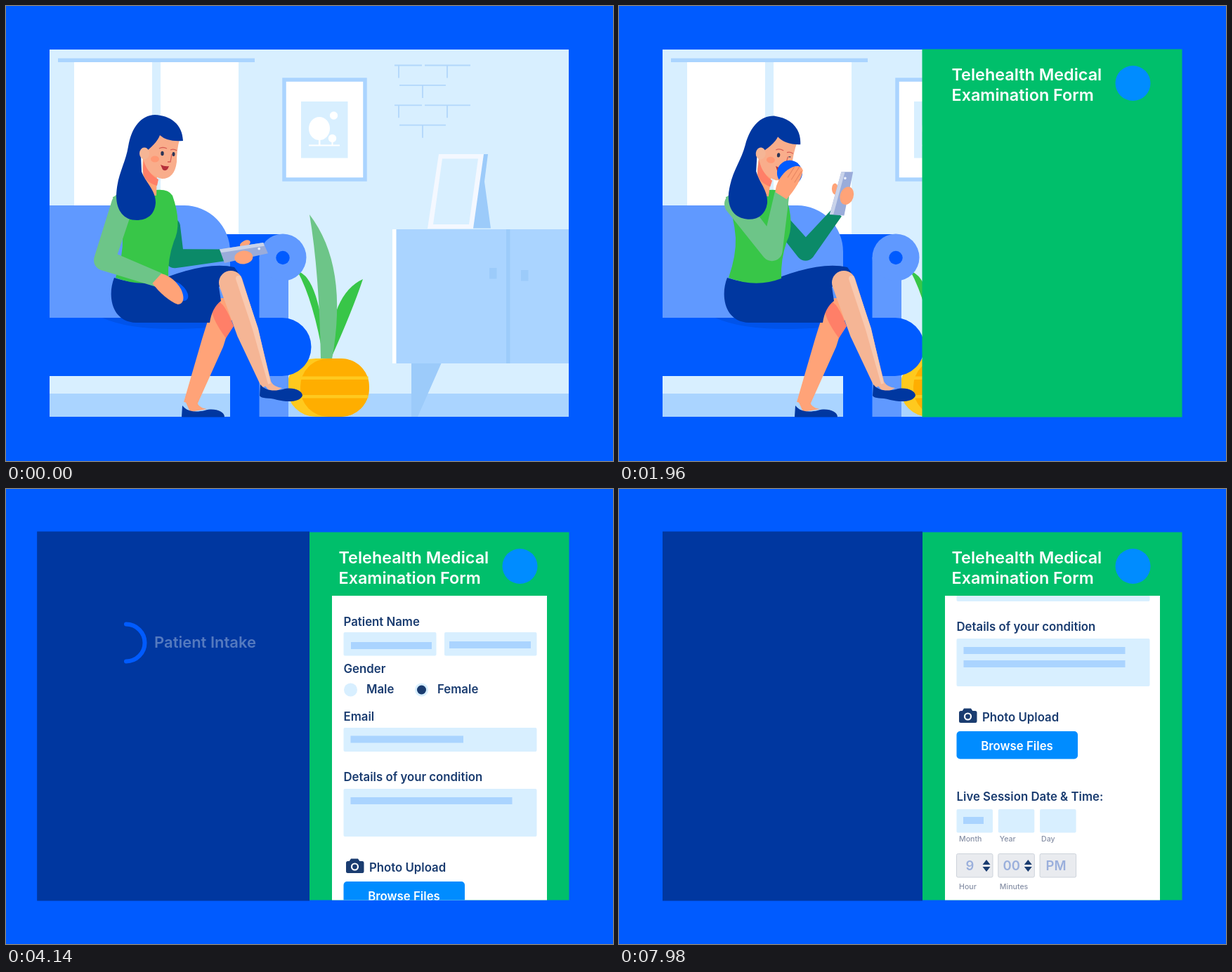
Write an HTML page that moves like this. It is 864 px wide and 648 px high and loops after 8000 ms.

```html
<!DOCTYPE html>
<html lang="en">
<head>
<meta charset="utf-8">
<title>Telehealth form</title>
<style>
html, body { margin: 0; width: 100%; height: 100%; overflow: hidden; background: #005bff; }
svg { display: block; width: 100%; height: 100%; }
text { font-family: Inter, "Open Sans", sans-serif; font-weight: 600; }
.sky { fill: #d8efff } .pale { fill: #aad4ff } .shade { fill: #9ccbfa } .white { fill: #fff }
.blue { fill: #005bff } .soft { fill: #6099ff } .navy { fill: #0037a0 }
.green { fill: #38c648 } .mint { fill: #6dc588 } .teal { fill: #0b8a68 }
.skin { fill: #ffa378 } .peach { fill: #f5b595 } .coral { fill: #ff7f68 }
.ink { fill: #1a3c70; font-size: 16.8px }
.small { font-size: 10.6px; font-weight: 500; fill: #8790a6 }
.value { font-size: 18.5px; fill: #9aafdc }
.line { fill: none; stroke: #005bff; stroke-width: 6; stroke-linecap: round; stroke-linejoin: round }
</style>
</head>
<body>
<svg viewBox="0 0 864 648">
<defs>
  <clipPath id="roomClip"><path d="M62 61H802V585.5H62z"/></clipPath>
  <clipPath id="cardClip"><path d="M464 152H770V585.5H464z"/></clipPath>
  <path id="shoe" d="M1 0C8 9 20 10 33 7 46 3 61 8 61 16 57 26 38 25 25 22 12 18 3 21 0 16z"/>
</defs>

<g clip-path="url(#roomClip)">
  <path class="sky" d="M62 62H801V585H62z"/>
  <path class="pale" d="M62 552H801V585H62zM74 74.5H354V80H74z"/>
  <path class="white" d="M97 80H208V325H97zM220 80H331V325H220z"/>

  <rect class="white" x="396" y="105" width="115" height="142" stroke="#aad4ff" stroke-width="5.5"/>
  <path class="sky" d="M420 136H486.500V216.500H420z"/>
  <g class="white">
    <ellipse cx="446" cy="174.500" rx="15" ry="16.500"/><circle cx="466.500" cy="156" r="5.700"/><circle cx="464.500" cy="188.500" r="5.700"/>
    <path d="M431 197.500H475V199.500H431zM445 188h2.500v10h-2.500zM463.500 192h2v6h-2z"/>
  </g>
  <path id="bricks" fill="none" stroke="#b2d7fb" stroke-width="1.800"/>

  <path class="shade" d="M679 211H686L681 250 690 316.500H664z"/>
  <path fill="#f4f8ff" d="M616 211H680L665 317H600z"/>
  <path class="sky" d="M621 217.500H672L659 311H608z"/>
  <path class="white" d="M550 318H556V509H550z"/>
  <path class="pale" d="M555.500 318H801V509H555.500z"/>
  <path class="shade" d="M712 318h5.500v191h-5.500zM688 373h10.500v15.500h-10.500zM733 376h10.500v15.500h-10.500zM577 509H619.500L586 585H577z"/>

  <path class="green" d="M452 503Q438 420 415 378 446 385 456 503zM459 503Q462 410 508 389 493 434 462 503z"/>
  <path class="mint" d="M448 503Q446 380 432 297 488 370 464 503z"/>
  <rect x="400" y="502" width="117" height="83" rx="41" fill="#ffc91e"/>
  <rect x="419" y="502" width="98" height="83" rx="40" fill="#ffae00"/>
  <path fill="#ffc91e" d="M419 527.500H515.500V532H418zM418 554H515.500V558.500H421z"/>

  <path class="blue" d="M300 325H394V527H300zM319 527H361V585H319z"/>
  <path class="soft" d="M62 284H253A66 66 0 0 1 319 350V444H62zM360.500 358H402V585H360.500z"/>
  <circle class="soft" cx="394" cy="358" r="33.500"/><circle class="blue" cx="394" cy="358.500" r="9.700"/>
  <path class="blue" d="M62 444H393A41.500 41.500 0 0 1 393 527H62z"/>
  <path fill="#0053ea" d="M137 444H310V456Q190 468 137 444z"/>

  <path class="skin" id="backLeg"/>
  <path class="coral" d="M297 421Q309 416 324 456L313 473Q296 450 293 435z"/>
  <path class="skin" d="M254 560H271Q272 572 286 574L262 578z"/>
  <use href="#shoe" class="navy" x="250" y="569"/>
  <path class="navy" d="M154 387Q200 402 232 385 290 364 325 372L331 380 303 400 306 420Q293 430 290 451H185C150 450 144 412 154 387z"/>
  <path class="peach" d="M364 535H377Q382 543 393 544L378 552z"/>
  <path class="peach" id="frontLeg"/><path id="shine" fill="#f9c9b0"/>
  <use href="#shoe" class="navy" x="361" y="539"/>

  <path class="teal" id="farSleeve"/>
  <path class="green" d="M152 272Q164 300 166 330 167 355 156 387 195 402 231 388 230 360 239 335 251 310 237 270 231 260 213 262L170 268z"/>
  <g id="farHand">
    <ellipse class="skin" cx="31" cy="-13" rx="8" ry="4.500" transform="rotate(-20 31 -13)"/>
    <path fill="#9aacda" d="M-6 -9L57 -12 62 4 -1 11z"/><path fill="#c9d3ea" d="M-6 -9L57 -12 58 -7 -4 -4z"/>
    <circle cx="50" cy="-4" r="1.800" fill="#edf2ff"/>
    <ellipse class="skin" cx="27" cy="6" rx="13" ry="9.500"/>
  </g>
  <path class="mint" id="sleeve"/>

  <g id="head">
    <path class="skin" d="M195 215Q192 256 206 270H214L215 240z"/>
    <path class="coral" d="M196 220Q203 240 217 247L215 256Q194 250 195 232z"/>
    <path fill="#f9ad8b" d="M196 203L219 180 247 190Q243 205 243 222 240 246 222 246 202 242 196 220z"/>
    <ellipse cx="212" cy="218" rx="6" ry="4.500" fill="#ff9874"/>
    <path d="M218 203Q223 200 229 203M234 205Q239 203 243 206M236 211L234 222H230" fill="none" stroke="#d85f55" stroke-width="1.300"/>
    <g fill="#2b3556"><ellipse cx="222.500" cy="210" rx="2.200" ry="3.200"/><ellipse id="farEye" cx="238.500" cy="211" rx="2" ry="3"/></g>
    <path fill="#b5303a" d="M220 226Q226 229 232 228 229 237 223 233z"/>
    <path id="tear" fill="#4b91f2" d="M212 206Q217 214 212 214T212 206z"/>
    <path class="navy" d="M252 192Q230 194 219 184 215 196 192 213L193 236C199 252 213 262 213 280 212 297 201 305 186 305 168 305 157 292 157 270 158 240 170 225 174 200 179 172 192 156 212 155 234 156 251 168 252 192z"/>
    <ellipse class="peach" cx="197" cy="210" rx="7" ry="8.500"/>
  </g>
  <g id="hand">
    <ellipse id="tissue" class="blue" cx="30" cy="-6" rx="18"/>
    <path class="skin" d="M-4 -9C8 -15 20 -15 32 -11 46 -5 48 3 43 8 32 13 12 13 -4 10z"/>
    <path id="fingers" fill="none" stroke="#ea8a64" stroke-width="1.300" d="M23 -5L41 -5M23 1L45 1M22 7L41 7"/>
  </g>
</g>

<rect id="panel" fill="#00bf6b"/>
<g id="header" class="white" font-size="23.400">
  <text x="473.500" y="106">Telehealth Medical</text><text x="473.500" y="135">Examination Form</text>
  <circle cx="731.500" cy="110" r="25" fill="#008cff"/>
</g>

<g clip-path="url(#cardClip)">
  <g id="card">
    <path class="white" d="M464 152H770V1000H464z"/>
    <g id="scroll">
      <g class="sky">
        <rect x="480.500" y="204" width="132" height="33.500" rx="2"/><rect x="624" y="204" width="131.500" height="33.500" rx="2"/>
        <rect x="480.500" y="340" width="275" height="34" rx="2"/><rect x="480.500" y="427" width="275" height="68" rx="2"/>
        <circle cx="490.500" cy="286" r="9.500"/><circle cx="591.500" cy="286" r="9.500"/>
      </g>
      <g class="ink">
        <text x="480.500" y="195">Patient Name</text><text x="480.500" y="262">Gender</text>
        <text x="513" y="291">Male</text><text x="614" y="291">Female</text>
        <text x="480.500" y="330">Email</text><text x="480.500" y="416">Details of your condition</text>
        <text x="517" y="544.500">Photo Upload</text><text x="480.500" y="657.500">Live Session Date &amp; Time:</text>
        <circle id="radio" cx="591.500" cy="286" r="6.500"/>
        <rect x="484" y="530" width="25.500" height="17" rx="2.500"/><path d="M488 531L491 526.500H501L504 531z"/>
        <circle cx="496.500" cy="538" r="4.500" stroke="#fff" stroke-width="2.200"/>
      </g>
      <rect x="480.500" y="559" width="172.500" height="39.500" rx="5" fill="#008cff"/>
      <text class="white" x="566.500" y="586" font-size="16.800" text-anchor="middle">Browse Files</text>
      <g id="session"></g>
      <g class="line" style="stroke: #aad4ff; stroke-width: 10; stroke-linecap: butt">
        <path data-start="2620" d="M491 223h115"/><path data-start="2980" d="M631 222h116"/><path data-start="3660" d="M490.500 356.500h160.500"/>
        <path data-start="4080" d="M490.500 444h230"/><path data-start="4320" d="M490.500 463h230"/><path data-start="7000" d="M490 686h29"/>
      </g>
    </g>
  </g>
</g>

<rect id="side" class="navy" y="60.500" height="526"/>
<g clip-path="url(#roomClip)"><g id="items" class="white">
  <g data-start="4080">
    <text x="211" y="226" font-size="22">Patient Intake</text>
    <path class="line link" d="M369 219.500H472"/><g class="tick" transform="translate(171 219)"></g>
  </g>
  <g data-start="4380">
    <text font-size="20.400"><tspan x="213" y="442">Symptom</tspan><tspan x="213" y="468">Assessment</tspan></text>
    <path class="line link" d="M343 453.500H472"/><g class="tick" transform="translate(171 452.500)"></g>
  </g>
</g></g>
</svg>

<script>
const $ = id => document.getElementById(id);
const all = selector => [...document.querySelectorAll(selector)];
const set = (el, attrs) => { for (const k in attrs) el.setAttribute(k, attrs[k]); };
const mix = (a, b, p) => a + (b - a) * p;
const smooth = p => p * p * (3 - 2 * p);
const easeOut = p => 1 - (1 - p) ** 2;
// The picture advances in 60 ms steps; returns progress 0..1.
const steps = (t, start, count) => Math.max(0, Math.min(count, Math.floor((t - start) / 60) + 1)) / count;

// Swings past the end and settles back.
const swing = p => (1 - Math.cos(3.62 * p ** 0.94)) / (1 - Math.cos(3.62));

const polar = ([x, y], length, degrees) => {
  const a = degrees * Math.PI / 180;
  return [x + length * Math.cos(a), y + length * Math.sin(a)];
};

// Tapered limb through joints, round everywhere but at its far end.
function limb(joints, radii) {
  return joints.slice(1).map((b, i) => {
    const a = joints[i], r = radii[i], s = radii[i + 1];
    const length = Math.hypot(b[0] - a[0], b[1] - a[1]);
    const nx = (a[1] - b[1]) / length, ny = (b[0] - a[0]) / length;
    return `M${a[0] - r} ${a[1]}a${r} ${r} 0 1 0 ${2 * r} 0a${r} ${r} 0 1 0 ${-2 * r} 0z` +
      `M${a[0] + nx * r} ${a[1] + ny * r}L${b[0] + nx * s} ${b[1] + ny * s} ${b[0] - nx * s} ${b[1] - ny * s} ${a[0] - nx * r} ${a[1] - ny * r}z`;
  }).join('');
}

function arm(sleeve, hand, shoulder, lengths, radii, upperAngle, lowerAngle, handAngle) {
  const elbow = polar(shoulder, lengths[0], upperAngle);
  const wrist = polar(elbow, lengths[1], lowerAngle);
  set($(sleeve), { d: limb([shoulder, elbow, wrist], radii) });
  set($(hand), { transform: `translate(${wrist}) rotate(${handAngle})` });
}

function buildStill() {
  let bricks = '';
  for (let row = 0; row < 4; row++) {
    const y = 84.5 + 28.4 * row;
    bricks += row % 2 ? `M560 ${y}h66m-33 0v18` : `M553 ${y}h39m4 0h65M559 ${y}v18M628 ${y}v18`;
  }
  set($('bricks'), { d: bricks });
  set($('backLeg'), { d: limb([[309, 432], [294, 480], [262, 567]], [16, 16, 9.5]) });
  set($('frontLeg'), { d: limb([[320, 394], [344, 465], [371, 541]], [17, 15.5, 7.5]) });
  set($('shine'), { d: limb([[331, 388], [355, 460], [375, 538]], [4, 4, 2]) });

  const column = i => 480.5 + 59.3 * i;
  const box = (i, y, look) => `<rect x="${column(i)}" y="${y}" width="51.5" height="33.5" rx="2" ${look}/>`;
  const note = (i, y, words) => `<text class="small" x="${column(i) + (i ? 2 : 3.5)}" y="${y}">${words}</text>`;
  $('session').innerHTML = ['Month', 'Year', 'Day'].map((name, i) => box(i, 670, 'class="sky"') + note(i, 716, name)).join('') +
    ['9', '00', 'PM'].map((value, i) => box(i, 733.5, 'fill="#e9ebef" stroke="#cdd3db"') +
      `<text class="value" text-anchor="middle" x="${column(i) + (i ? 19 + 4 * (i - 1) : 19)}" y="757">${value}</text>`).join('') +
    ['Hour', 'Minutes'].map((name, i) => note(i, 784, name) +
      `<path class="ink" d="M${column(i) + 37} 749l5.500 -7 5.500 7zm0 3l5.500 7 5.500 -7z"/>`).join('');

  all('.tick').forEach(tick => tick.innerHTML =
    '<circle class="line ring" r="26.500" transform="rotate(-90)"/><path class="line check" style="stroke-width:7" d="M-12 1L-3 12 12.500 -11"/>');
  all('.line:not(g)').concat(all('[data-start][d]')).forEach(el => set(el, { pathLength: 1 }));
}

const draw = (el, p) => set(el, { 'stroke-dasharray': p < 1 ? `${p} 2` : 'none', opacity: p > 0 ? 1 : 0 });

function drawWoman(t) {
  const p = smooth(steps(t, 700, 14));
  const forearm = mix(20, -80, p);
  arm('sleeve', 'hand', [166, 282], [84, 83], [16, 15, 10.5], mix(108, 52, p), forearm, forearm + 22);
  arm('farSleeve', 'farHand', [236, 314], [46, 71], [12, 13.5, 8.5], mix(85, 50, p), mix(-4, -51, p), mix(-6, -72, p));
  set($('head'), { transform: `translate(${-p} ${-p}) rotate(${5.5 * p} 190 270)` });
  set($('farEye'), { ry: mix(3, 0.6, p) });
  set($('tissue'), { ry: mix(10, 18, p) });
  set($('fingers'), { opacity: p });
  set($('tear'), { opacity: t >= 1240 && t < 1780 ? 1 : 0 });
}

function drawForm(t) {
  const rise = easeOut((steps(t, 1420, 4) * 4 - 1) / 3);
  const grow = smooth(steps(t, 1660, 5));
  set($('panel'), {
    x: mix(638, 431.5, grow), y: mix(mix(576, 263, rise) - 3, 61.5, grow),
    width: mix(139.5, 370, grow), height: mix(6, 524, grow), rx: mix(3, 0, grow), opacity: t < 1420 ? 0 : 1
  });
  set($('header'), { opacity: steps(t, 1840, 2) });
  set($('card'), { transform: `translate(0 ${434 * (1 - easeOut(steps(t, 2020, 4)))})` });
  set($('radio'), { opacity: t < 3240 ? 0 : 1 });
  all('path[data-start]').forEach(bar => draw(bar, steps(t, +bar.dataset.start, 2)));
}

function drawSide(t) {
  const width = 370 * swing(steps(t, 3960, 5));
  set($('side'), { x: 432 - width, width });
  all('g[data-start]').forEach(item => {
    const start = +item.dataset.start, part = name => item.querySelector(name);
    draw(part('.ring'), steps(t, start, 4));
    set(part('text'), { opacity: steps(t, start + 60, 3) });
    draw(part('.link'), steps(t, start + 120, 4));
    draw(part('.check'), steps(t, start + 180, 5));
  });
  const transform = `translate(0 ${-214 * steps(t, 7860, 3)})`;
  set($('scroll'), { transform });
  set($('items'), { transform, opacity: t < 7980 ? 1 : 0 });
}

function frame() {
  const t = performance.now() % 8000;
  drawWoman(t);
  drawForm(t);
  drawSide(t);
  requestAnimationFrame(frame);
}
buildStill();
frame();
</script>
</body>
</html>
```
